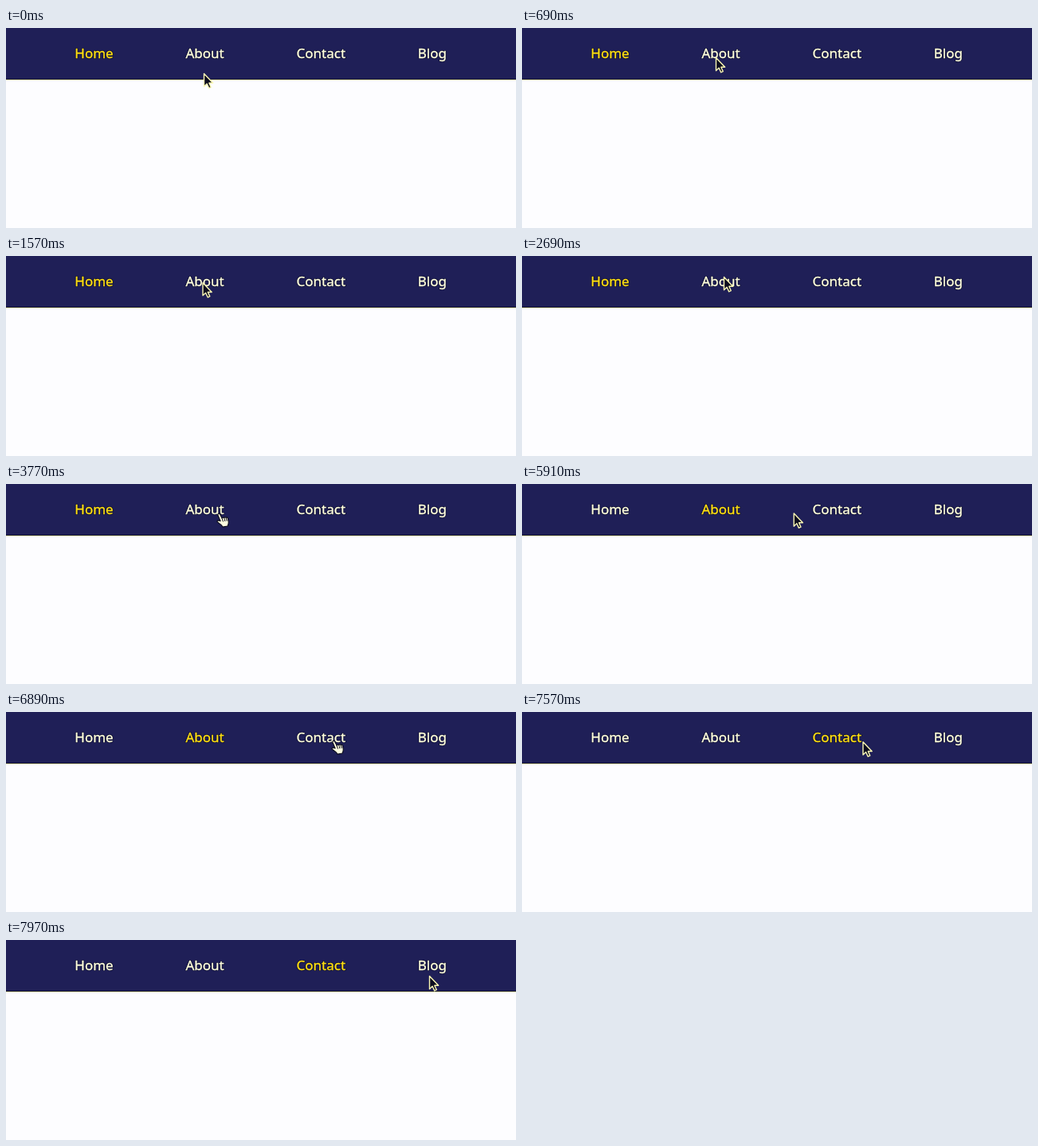
An HTML page with a canvas that plays this animation: 640 by 252 pixels, repeating every 7.99 s.

```html
<!DOCTYPE html>
<html lang="en">
<head>
<meta charset="utf-8">
<title>Navigation bar</title>
<style>
  html, body { margin: 0; width: 100%; height: 100%; overflow: hidden; background: #fdfdff; }
  canvas { display: block; width: 640px; height: 252px; }
</style>
</head>
<body>
<canvas id="stage"></canvas>
<script>
const LOOP = 7990;
const INK = '#0c0c1e';
const canvas = document.getElementById('stage');
const ctx = canvas.getContext('2d');
const scale = window.devicePixelRatio || 1;
canvas.width = 640 * scale;
canvas.height = 252 * scale;

const labels = ['Home', 'About', 'Contact', 'Blog'];
const firstX = 86.3;
const gap = 90.8;

// places where the pointer presses a link, and when
const presses = [
  { x: 267, y: 37, time: 4560 },
  { x: 411, y: 36, time: 7200 }
];

// the pointer glides from stop to stop
const start = { x: 248, y: 57 };
const glides = [
  { from: 0, to: 690, x: 243, y: 37 },
  { from: 830, to: 2690, x: 253, y: 26 },
  { from: 2750, to: 3770, ...presses[0] },
  { from: 5200, to: 6600, ...presses[1] },
  { from: 7450, to: 7970, x: 531, y: 45 }
];

const arrow = new Path2D('M0 0V16.2L3.6 12.8L6.2 18.4L8.8 17.2L6.3 11.8H11.2Z');
const hand = new Path2D(
  'M-1.6 .6Q-.6 -.9 .8 .3L3.6 5.8Q4.6 4 6.2 5.1Q7.2 3.8 8.6 4.8' +
  'Q10.2 4 10.8 5.6L11.8 10Q12 12.6 10.6 15.5L4.6 16.6' +
  'Q3 14 .2 12.3L-2.4 10.2Q-2.8 8.4 -.8 8.4L1.6 9.2L-1.4 2.3Z');
const knuckles = new Path2D('M3.6 5.8L5 10M6.2 5.1L7.4 9.6M8.6 4.8L9.6 9.2');

const ease = k => k * k * (3 - 2 * k);
const progress = (t, { from, to }) => ease(Math.min(1, Math.max(0, (t - from) / (to - from))));

function pointerAt(t) {
  return glides.reduce((p, g) => {
    const k = progress(t, g);
    return { x: p.x + (g.x - p.x) * k, y: p.y + (g.y - p.y) * k };
  }, start);
}

// the picture rests for 100 ms in every 840 ms
function withRests(t) {
  const phase = (t + 10) % 840;
  return t - Math.max(0, phase - 740);
}

function paint(path, fill, stroke, width) {
  ctx.fillStyle = fill;
  ctx.strokeStyle = stroke;
  ctx.lineWidth = width;
  ctx.fill(path);
  ctx.stroke(path);
}

function drawPointer({ x, y }) {
  const pressing = presses.some(p => Math.hypot(p.x - x, p.y - y) < 12);
  ctx.save();
  ctx.translate(x + .5, y + .5);
  if (pressing) {
    paint(hand, '#fffee0', INK, 1.2);
    ctx.lineWidth = 1;
    ctx.stroke(knuckles);
  } else {
    paint(arrow, INK, '#fbf8b4', 1.4);
  }
  ctx.restore();
}

function drawLabel(label, x, colour) {
  const outline = (style, width) => {
    ctx.strokeStyle = style;
    ctx.lineWidth = width;
    ctx.strokeText(label, x, 38);
  };
  outline('#12123a', 2.2);
  outline(colour, .35);
  ctx.fillStyle = colour;
  ctx.fillText(label, x, 38);
}

function drawBar() {
  const band = (colour, y, height) => {
    ctx.fillStyle = colour;
    ctx.fillRect(0, y, 640, height);
  };
  band('#fdfdff', 0, 252);
  band('#1f1f57', 0, 64);
  band('#141432', 64, 1);
  band('#f4f4b4', 65, 1);
}

function draw(t) {
  ctx.setTransform(scale, 0, 0, scale, 0, 0);
  ctx.lineJoin = 'round';
  ctx.font = '17px "Noto Sans", "Open Sans", sans-serif';
  drawBar();

  const chosen = presses.filter(p => p.time <= t).length;
  let x = firstX;
  labels.forEach((label, i) => {
    drawLabel(label, x, i === chosen ? '#ffe010' : '#ffffdc');
    x += ctx.measureText(label).width + gap;
  });
  drawPointer(pointerAt(t));
}

function frame() {
  draw(withRests(performance.now() % LOOP));
  requestAnimationFrame(frame);
}
frame();
</script>
</body>
</html>
```
